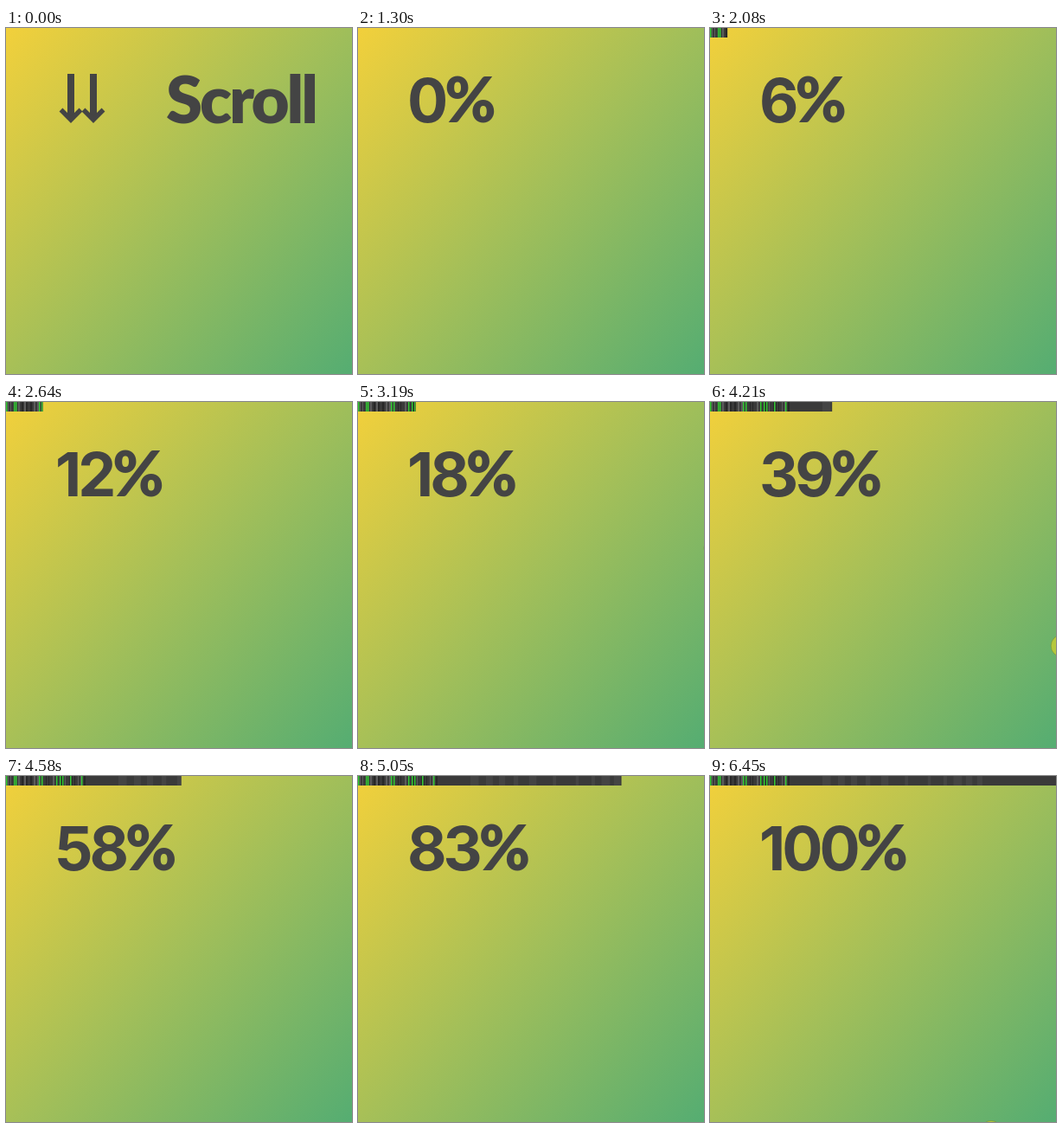
Write an HTML page that moves like this. It is 400 px wide and 400 px high and loops after 6520 ms.

```html
<!DOCTYPE html>
<html lang="en">
<head>
<meta charset="utf-8">
<title>Scroll progress</title>
<style>
  html, body { margin: 0; width: 100%; height: 100%; overflow: hidden; }
  body { background: linear-gradient(132deg, #f2d03b, #a3bf59 50%, #55ad72); }
  svg { display: block; width: 100vw; height: 100vh; }
  text { fill: #444; }
  .title { font: 900 76px Lato, sans-serif; letter-spacing: -3px; }
  .count { font: 700 70px Inter, sans-serif; letter-spacing: -4px; }
  .sign { font: 900 71px Lato, sans-serif; }
  .arrow { fill: none; stroke: #444; }
  .pointer { fill: #e6d71e; fill-opacity: .6; stroke: #5a6e28; stroke-opacity: .35; }
</style>
</head>
<body>
<svg viewBox="0 0 400 400">
  <defs>
    <clipPath id="shown"><rect id="width" height="11"/></clipPath>
    <g id="down" class="arrow">
      <path d="M0 53V105" stroke-width="8"/>
      <path d="M-11.5 94.5L0 106L11.5 94.5" stroke-width="5.5"/>
    </g>
  </defs>
  <g id="intro">
    <use href="#down" x="75"/>
    <use href="#down" x="101"/>
    <text class="title" x="185" y="110">Scroll</text>
  </g>
  <text id="count" class="count" x="57" y="108.5"><tspan id="number"></tspan><tspan class="sign">%</tspan></text>
  <g id="bar" clip-path="url(#shown)"><rect width="400" height="11" fill="#3a3a3a"/></g>
  <circle id="pointer" class="pointer" r="13"/>
</svg>
<script>
  const LOOP = 6520, START = 1270, BAR_DELAY = 130;
  const $ = id => document.getElementById(id);

  // Scroll position in percent: [time, percent], linear between points
  const scrollKeys = [[START, 0], [2080, 6], [3190, 18], [3810, 27], [4300, 42],
    [4580, 58], [5050, 83], [5240, 100]];

  function scrolled(t) {
    const i = scrollKeys.findIndex(key => key[0] > t);
    if (i === 0) return 0;
    if (i < 0) return 100;
    const [t0, p0] = scrollKeys[i - 1], [t1, p1] = scrollKeys[i];
    return p0 + (p1 - p0) * (t - t0) / (t1 - t0);
  }

  function pointerAt(t, barPercent) {
    if (t < 50) return null;
    if (t < 160) {
      const k = (t - 50) / 110;
      return [346 + 33 * k, 398 - 27 * Math.sin(Math.PI * k)];
    }
    if (t >= 6450) return [325, 411.5];
    // Dragging down along the right edge
    return [403 + 10 * ((t - 3810) / 620) ** 2, 68 + 6.06 * barPercent];
  }

  let seed = 7;
  const random = () => (seed = seed * 16807 % 2147483647) / 2147483647;

  function stripe(x, width, fill) {
    const rect = document.createElementNS("http://www.w3.org/2000/svg", "rect");
    const attrs = { x, width, height: 11, fill };
    for (const name in attrs) rect.setAttribute(name, attrs[name]);
    $("bar").append(rect);
  }

  // Busy grey stripes on the left, faint wide ones after them
  for (let x = 2; x < 94; x += 2 + Math.floor(random() * 4))
    stripe(x, 1 + Math.floor(random() * 2), random() < .6 ? "#282828" : "#5c5c5c");
  for (let x = 130; x < 325; x += 10 + random() * 20)
    stripe(x, 3 + random() * 7, "#444");
  for (const x of [0, 9, 11, 38, 41, 58, 62, 65, 74, 87]) stripe(x, 1.5, "#32c832");

  function draw(t) {
    const started = t >= START;
    const barPercent = scrolled(t - BAR_DELAY);
    const spot = pointerAt(t, barPercent);
    $("intro").style.display = started ? "none" : "";
    $("count").style.display = started ? "" : "none";
    $("number").textContent = Math.round(scrolled(t));
    $("width").setAttribute("width", 4 * barPercent);
    $("pointer").style.display = spot ? "" : "none";
    if (spot) $("pointer").setAttribute("transform", `translate(${spot})`);
  }

  const begin = performance.now();
  function tick() {
    draw((performance.now() - begin) % LOOP);
    requestAnimationFrame(tick);
  }
  tick();
</script>
</body>
</html>
```
